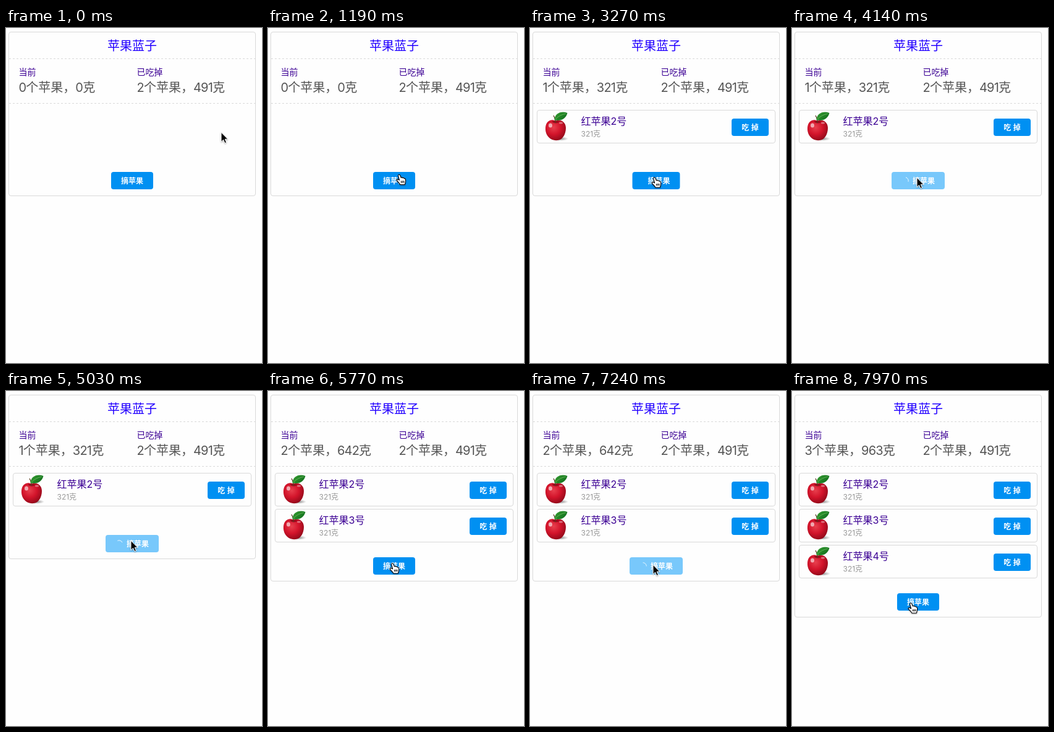
Write an HTML page that moves like this. It is 414 px wide and 540 px high and loops after 8 s.

```html
<!DOCTYPE html>
<html lang="zh-CN">
<head>
<meta charset="utf-8">
<title>苹果蓝子</title>
<style>
html, body { margin: 0; width: 100%; height: 100%; overflow: hidden; background: #fefefe; }
svg { display: block; font-family: Inter, "Noto Sans CJK SC", "Noto Sans CJK", sans-serif; }
.box { fill: none; stroke: #d9d9d9; }
.dash { stroke: #d9d9d9; stroke-dasharray: 3 3; }
.title { font-size: 20px; fill: #2200ff; text-anchor: middle; }
.label { font-size: 14px; fill: #3c0094; }
.total { font-size: 20px; fill: #555; }
.total tspan { letter-spacing: -.04em; }
.name { font-size: 16px; fill: #3c0094; }
.weight { font-size: 12px; fill: #999; }
.btn { fill: #0090f2; }
.btn.busy { fill: #78c8fb; }
.btn-text { font-size: 12px; font-weight: 700; fill: #fff; }
.mid { text-anchor: middle; word-spacing: .6px; }
</style>
</head>
<body>
<svg width="414" height="540" viewBox="0 0 414 540">
  <defs>
    <radialGradient id="skin" cx=".4" cy=".36" r=".7">
      <stop offset="0" stop-color="#e8404e"/>
      <stop offset=".5" stop-color="#d3142b"/>
      <stop offset="1" stop-color="#8c0818"/>
    </radialGradient>
    <linearGradient id="leaf" x2="1" y2=".6">
      <stop offset="0" stop-color="#38a032"/>
      <stop offset="1" stop-color="#12701e"/>
    </linearGradient>
    <radialGradient id="shade">
      <stop offset="0" stop-color="#888"/>
      <stop offset="1" stop-color="#888" stop-opacity="0"/>
    </radialGradient>
    <filter id="soft" x="-50%" y="-50%" width="200%" height="200%">
      <feDropShadow dx="0" dy="1" stdDeviation="1" flood-opacity=".35"/>
    </filter>
    <!-- one basket row, 58px pitch -->
    <g id="row">
      <rect class="box" x="11.5" y="132.5" width="385" height="53" rx="3.5"/>
      <ellipse cx="49" cy="178.5" rx="13" ry="3.5" fill="url(#shade)"/>
      <path fill="url(#skin)" d="M41 150C47 146 58 150 58 161C58 171 53 179 47 180.5Q41 182 36 180C29 177 24.5 170 25 161C25.5 149 36 146 41 150Z"/>
      <path fill="#980c1d" d="M35 151Q41 147.5 48 151Q42 156 35 151Z"/>
      <path fill="none" stroke="#5a3a20" stroke-width="1.3" d="M41 153Q41 146 38 141"/>
      <path fill="url(#leaf)" d="M39.5 148C40 138 50 133 60.5 137C58 147 48 151 39.5 148Z"/>
      <path fill="none" stroke="#8ccf74" stroke-width=".6" d="M41 147Q48 140 58 138"/>
      <ellipse cx="33" cy="157" rx="3" ry="3.5" fill="#fff" opacity=".6"/>
      <ellipse cx="50" cy="153" rx="3" ry="1.5" fill="#fff" opacity=".4"/>
      <text class="weight" x="82.5" y="175">321克</text>
      <rect class="btn" x="326" y="146" width="60" height="28" rx="4"/>
      <text class="btn-text mid" x="356" y="164.6">吃 掉</text>
    </g>
  </defs>

  <rect id="card" class="box" x="4.5" y="6.5" width="399" height="264" rx="3.5"/>
  <text class="title" x="204" y="35.8">苹果蓝子</text>
  <path class="dash" d="M5 49.5H403M5 121.5H403"/>
  <text class="label" x="20.5" y="76">当前</text>
  <text class="total" x="20.5" y="103.4"><tspan id="count"></tspan>个苹果，<tspan id="grams"></tspan>克</text>
  <text class="label" x="211.5" y="76">已吃掉</text>
  <text class="total" x="211.5" y="103.4"><tspan>2</tspan>个苹果，<tspan>491</tspan>克</text>
  <g id="rows"></g>

  <g id="pick">
    <rect id="wave" fill="none" stroke="#0090f2"/>
    <rect id="pickBox" class="btn" height="28" rx="4"/>
    <path id="spinner" fill="none" stroke="#fff" stroke-width=".8" stroke-linecap="round" d="M0 -5.3A5.3 5.3 0 0 1 5.3 0"/>
    <text id="pickText" class="btn-text" y="18.6">摘苹果</text>
  </g>

  <g id="cursor" filter="url(#soft)" stroke-linejoin="round">
    <path id="arrow" stroke="#fff" d="M0 .3V15.5L3.5 12.2L6 17.6L8.5 16.5L6.2 11.2H10.8Z"/>
    <path id="hand" fill="#fff" stroke="#000" stroke-width="1.1" d="M-2.4 1.4Q-1.6 -1.4 .6 .6L2.2 4.8Q4 3.8 5 5.2Q6.8 4.4 7.6 6.2Q9.2 6 9.6 8C10 11.5 9 13 8.4 16H1C-.2 13.6 -3 11.4 -4.6 9.2C-5.4 7.2 -3 6.8 -1.4 8.2L-.4 8.8ZM2.6 10V13.2M4.7 9.8V13.2M6.8 9.8V13"/>
  </g>
</svg>
<script>
const LOOP = 8000, GROW = 300;
const el = id => document.getElementById(id);
const set = (id, attrs) => { for (const k in attrs) el(id).setAttribute(k, attrs[k]); };
const clamp = v => Math.min(1, Math.max(0, v));
const ease = v => v * v * (3 - 2 * v);

// Each pick: loading interval, and a moment when the spinner is upright.
const picks = [
  { start: 1490, end: 3120, upright: 1565 },
  { start: 3850, end: 5330, upright: 4100 },
  { start: 6210, end: 7560, upright: 6240 }
];

// Pointer stops: time, x, y
const path = [
  [400, 348, 168], [1350, 202, 242], [1600, 201, 240], [1950, 201, 240],
  [2300, 202, 241], [5400, 202, 241], [5700, 202, 278], [6000, 202, 278],
  [6200, 199, 280], [7620, 199, 280], [7940, 193, 342]
];

el('rows').innerHTML = picks.map((_, i) => `<g transform="translate(0 ${58 * i})">
  <use href="#row"/><text class="name" x="82.5" y="156">红苹果${i + 2}号</text></g>`).join('');
const rows = [...el('rows').children];

function pointerAt(t) {
  const i = path.findIndex(p => p[0] > t);
  if (i === 0) return path[0].slice(1);
  if (i < 0) return path[path.length - 1].slice(1);
  const [a, b] = [path[i - 1], path[i]];
  const k = ease((t - a[0]) / (b[0] - a[0]));
  return [a[1] + (b[1] - a[1]) * k, a[2] + (b[2] - a[2]) * k];
}

function drawPick(t, top) {
  const pick = picks.filter(p => t >= p.start - 80).pop();
  const busy = !!pick && t >= pick.start && t < pick.end;
  const open = pick ? ease(clamp((t - pick.start) / GROW)) - ease(clamp((t - pick.end) / GROW)) : 0;
  const width = 68 + 18 * open, left = 204 - width / 2;

  set('pick', { transform: `translate(0 ${top})` });
  set('pickBox', { x: left, width, class: busy ? 'btn busy' : 'btn' });
  set('pickText', { x: left + 16 + 18 * open });
  set('spinner', {
    transform: `translate(${left + 22} 14) rotate(${pick ? (t - pick.upright) * 0.36 : 0})`,
    opacity: busy ? open : 0
  });

  const age = pick ? t - pick.start + 80 : LOOP;
  const spread = 4 * (1 - (1 - clamp(age / 200)) ** 2);
  set('wave', {
    x: left - spread / 2, y: -spread / 2, width: width + spread, height: 28 + spread,
    rx: 4 + spread / 2, 'stroke-width': spread, opacity: 0.35 * (1 - clamp(age / 300))
  });
  return { busy, left, width };
}

function render(t) {
  const count = picks.filter(p => t >= p.end).length;
  const bottom = Math.max(270, 190 + 58 * count), top = bottom - 38;
  set('card', { height: bottom - 6 });
  el('count').textContent = count;
  el('grams').textContent = count * 321;
  rows.forEach((row, i) => row.setAttribute('visibility', i < count ? 'visible' : 'hidden'));

  const { busy, left, width } = drawPick(t, top);
  const [x, y] = pointerAt(t);
  const over = x > left && x < left + width && y > top && y < top + 28;
  const hand = over && !busy;
  set('cursor', { transform: `translate(${x} ${y})` });
  set('hand', { visibility: hand ? 'visible' : 'hidden' });
  set('arrow', { visibility: hand ? 'hidden' : 'visible' });
}

function tick() {
  render(performance.now() % LOOP);
  requestAnimationFrame(tick);
}
tick();
</script>
</body>
</html>
```
